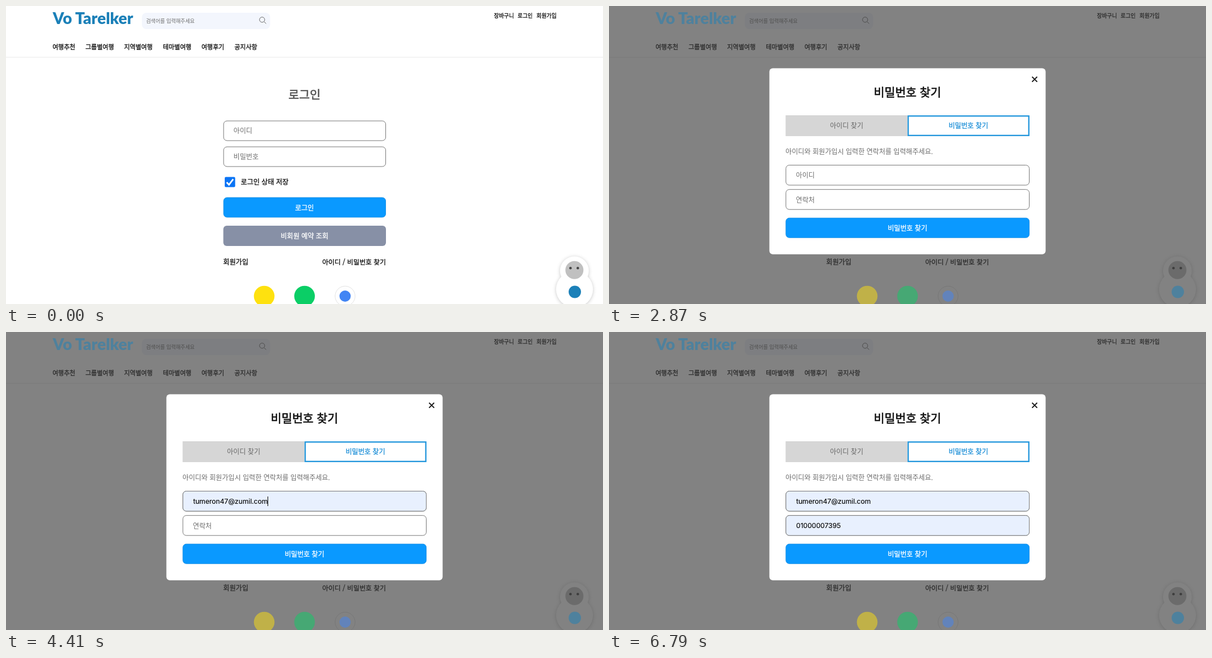
These frames come from a looping animation (1059x529 px, 8 s). An HTML page:

```html
<!DOCTYPE html>
<html lang="ko">
<head>
<meta charset="utf-8">
<title>로그인</title>
<style>
html, body { margin: 0; width: 100%; height: 100%; overflow: hidden; background: #fff; }
svg { display: block; width: 100vw; height: 100vh; }
text { font: 500 12.1px "Noto Sans CJK KR", "Noto Sans CJK", "Noto Sans KR", sans-serif; fill: #111; stroke: #111; stroke-width: .3px; }
.mid { text-anchor: middle; }
.end { text-anchor: end; }
.small { font-size: 9.7px; }
.nav text { font-size: 11px; }
.title { font-size: 20.6px; stroke-width: .6px; }
.hint { font-weight: 400; fill: #6c6c6c; stroke: none; }
.white { fill: #fff; stroke: #fff; }
.latin { font: 400 12.1px Inter, "Noto Sans", sans-serif; fill: #000; stroke-width: .15px; }
.list, .list text { font-size: 9.2px; }
.preview { font-size: 8.8px; }
.field { fill: #fff; stroke: #777; }
.filled { fill: #e8f0fe; stroke: #777; }
.primary { fill: #0a99ff; stroke: #2394e6; }
.tab-off { fill: #d6d6d6; }
.tab-on { fill: #fff; stroke: #2196dc; stroke-width: 2.3; }
.tab-label { fill: #1f90d8; stroke: #1f90d8; }
.tab-idle { fill: #666; font-weight: 400; stroke: none; }
.hover { fill: #e9e9e9; }
.popup { fill: #fff; filter: drop-shadow(0 1px 2px rgba(0,0,0,.16)); }
.bubble { fill: #fff; filter: drop-shadow(0 1px 3px rgba(0,0,0,.22)); }
.brand { font: 900 28.2px Lato, sans-serif; fill: #1b80b8; stroke: none; }

/* 8 s loop, 1% = 80 ms */
.step { visibility: hidden; animation: 8s step-end infinite; }
.dialog { animation-name: dialog; }
.find-id { animation-name: find-id; }
.find-pw { animation-name: find-pw; }
.id-hint { animation-name: id-hint; }
.id-fill { animation-name: id-fill; }
.id-menu { animation-name: id-menu; }
.id-hover { animation-name: id-hover; }
.id-value { animation-name: id-value; }
.id-caret { animation-name: id-caret; }
.id-end { animation-name: id-end; }
.tel-hint { animation-name: tel-hint; }
.tel-fill { animation-name: tel-fill; }
.tel-menu { animation-name: tel-menu; }
.tel-hover { animation-name: tel-hover; }
.tel-value { animation-name: tel-value; }
.tel-caret { animation-name: tel-caret; }
.tel-end { animation-name: tel-end; }
.art { animation: fade 8s step-end infinite; }
@keyframes fade { 0% { opacity: 1 } 13.125%, 100% { opacity: .5 } }
@keyframes dialog { 0% { visibility: hidden } 13.125%, 100% { visibility: visible } }
@keyframes find-id { 0%, 28.875%, 100% { visibility: hidden } 13.125% { visibility: visible } }
@keyframes find-pw { 0% { visibility: hidden } 28.875%, 100% { visibility: visible } }
@keyframes id-hint { 0%, 48.125%, 100% { visibility: hidden } 28.875% { visibility: visible } }
@keyframes id-fill { 0% { visibility: hidden } 48.125%, 100% { visibility: visible } }
@keyframes id-menu { 0%, 55.125%, 100% { visibility: hidden } 40.25% { visibility: visible } }
@keyframes id-hover { 0%, 55.125%, 100% { visibility: hidden } 48.125% { visibility: visible } }
@keyframes id-value { 0% { visibility: hidden } 55.125%, 100% { visibility: visible } }
@keyframes id-caret { 0%, 46.375%, 55.125%, 100% { visibility: hidden } 40.25%, 53.375% { visibility: visible } }
@keyframes id-end { 0%, 62.125%, 100% { visibility: hidden } 55.125% { visibility: visible } }
@keyframes tel-hint { 0%, 72.625%, 100% { visibility: hidden } 13.125% { visibility: visible } }
@keyframes tel-fill { 0% { visibility: hidden } 72.625%, 100% { visibility: visible } }
@keyframes tel-menu { 0%, 77.875%, 100% { visibility: hidden } 65.625% { visibility: visible } }
@keyframes tel-hover { 0%, 77.875%, 100% { visibility: hidden } 72.625% { visibility: visible } }
@keyframes tel-value { 0% { visibility: hidden } 77.875%, 100% { visibility: visible } }
@keyframes tel-caret { 0%, 71.75%, 100% { visibility: hidden } 65.625% { visibility: visible } }
@keyframes tel-end { 0%, 84.875%, 100% { visibility: hidden } 77.875% { visibility: visible } }
</style>
</head>
<body>
<svg viewBox="0 0 1059 529">
  <!-- Page -->
  <rect width="1059" height="529" fill="#fff"/>
  <rect x="241" y="12" width="227.5" height="29" rx="8" fill="#f3f6fd"/>
  <text class="hint" x="248.5" y="30.4" style="font-size:9.1px">검색어를 입력해주세요</text>
  <g fill="none" stroke="#666">
    <circle cx="454.3" cy="24.3" r="4.6"/>
    <path d="M457.6 27.6l3.8 3.8"/>
  </g>
  <text class="small" x="865.5" y="21">장바구니</text>
  <text class="small" x="907.5" y="21">로그인</text>
  <text class="small" x="941" y="21">회원가입</text>
  <g class="nav">
    <text x="82.5" y="77">여행추천</text>
    <text x="141" y="77">그룹별여행</text>
    <text x="209.5" y="77">지역별여행</text>
    <text x="278.3" y="77">테마별여행</text>
    <text x="346.7" y="77">여행후기</text>
    <text x="405.2" y="77">공지사항</text>
  </g>
  <path d="M0 91h1059" stroke="#e9e9e9"/>

  <text class="title mid" x="529.5" y="164.8" style="fill:#555;stroke:#555">로그인</text>
  <rect class="field" x="386" y="204" width="287.5" height="35" rx="6"/>
  <text class="hint" x="403.5" y="226.3">아이디</text>
  <rect class="field" x="386" y="250" width="287.5" height="35" rx="6"/>
  <text class="hint" x="403.5" y="272.3">비밀번호</text>
  <rect x="388" y="303.5" width="18.5" height="18" rx="2" fill="#0a74f5"/>
  <path d="M391.5 313l4 4.3 7.5-10" fill="none" stroke="#fff" stroke-width="2.8"/>
  <text x="416.5" y="317">로그인 상태 저장</text>
  <rect class="primary" x="386" y="340" width="287.5" height="35" rx="6"/>
  <text class="mid white" x="529.5" y="362.5">로그인</text>
  <rect x="385.5" y="390" width="288.5" height="36" rx="6" fill="#8790a6"/>
  <text class="mid white" x="529.5" y="413">비회원 예약 조회</text>
  <text x="385.3" y="458.5">회원가입</text>
  <text class="end" x="674" y="458.5" style="font-size:11.9px">아이디 / 비밀번호 찾기</text>
  <circle cx="601.5" cy="515" r="17.7" fill="#fff" stroke="#e2e2e2"/>
  <g class="bubble">
    <circle cx="1008.3" cy="470" r="25.5"/>
    <ellipse cx="1008.5" cy="503" rx="32.7" ry="32"/>
  </g>
  <circle cx="1008.3" cy="468.7" r="16" fill="#c0c0c0"/>
  <g fill="#444">
    <circle cx="1001.3" cy="465.3" r="2.3"/>
    <circle cx="1014.3" cy="465.3" r="2.3"/>
  </g>

  <rect class="step dialog" width="1059" height="529" fill="#3c3c3c" fill-opacity=".64"/>

  <g class="art">
    <text class="brand" x="83" y="32">Vo Tarelker</text>
    <circle cx="458" cy="515" r="18.3" fill="#fee10f"/>
    <circle cx="529.6" cy="515" r="18.3" fill="#0bce66"/>
    <circle cx="601.5" cy="515" r="10" fill="#4285f4"/>
    <circle cx="1009" cy="507.5" r="11" fill="#1b80b8"/>
  </g>

  <!-- Dialog -->
  <g class="step dialog">
    <rect x="284.5" y="110.5" width="490" height="330.3" rx="6" fill="#fff"/>
    <path d="M750.5 125.6l9 9m0-9l-9 9" stroke="#111" stroke-width="1.9"/>
    <rect class="field" x="313.8" y="282.5" width="431.7" height="35.5" rx="6"/>
    <rect class="field" x="313.8" y="325.7" width="431.7" height="35.5" rx="6"/>
    <rect class="primary" x="313.8" y="376.3" width="431.7" height="35" rx="6"/>
  </g>

  <g class="step find-id">
    <text class="title mid" x="529.5" y="160.5">아이디 찾기</text>
    <rect class="tab-off" x="529.5" y="194" width="216.5" height="37"/>
    <rect class="tab-on" x="314.5" y="195.3" width="213.8" height="34.5"/>
    <text class="tab-label mid" x="421.5" y="217.3">아이디 찾기</text>
    <text class="tab-idle mid" x="637.5" y="217.3">비밀번호 찾기</text>
    <text class="hint" x="313" y="263.3">회원가입시 입력한 연락처를 입력해주세요.</text>
    <text class="hint" x="331.5" y="305.3">이름</text>
    <text class="mid white" x="529.5" y="398.7">아이디 찾기</text>
  </g>

  <g class="step find-pw">
    <text class="title mid" x="529.5" y="160.5">비밀번호 찾기</text>
    <rect class="tab-off" x="313.3" y="194" width="216.2" height="37"/>
    <rect class="tab-on" x="530.7" y="195.3" width="214" height="34.5"/>
    <text class="tab-idle mid" x="421.5" y="217.3">아이디 찾기</text>
    <text class="tab-label mid" x="637.5" y="217.3">비밀번호 찾기</text>
    <text class="hint" x="313" y="263.3">아이디와 회원가입시 입력한 연락처를 입력해주세요.</text>
    <text class="mid white" x="529.5" y="398.7">비밀번호 찾기</text>
  </g>

  <!-- Account field -->
  <text class="hint step id-hint" x="331.5" y="305.3">아이디</text>
  <rect class="filled step id-fill" x="313.8" y="282.5" width="431.7" height="35.5" rx="6"/>
  <text class="latin preview step id-hover" x="332" y="305">tumeron47@zumil.com</text>
  <text class="latin step id-value" x="332" y="305">tumeron47@zumil.com</text>
  <rect class="step id-caret" x="332" y="292" width="1" height="17"/>
  <rect class="step id-end" x="464" y="292" width="1" height="17"/>

  <!-- Contact field -->
  <text class="hint step tel-hint" x="331.5" y="348.5">연락처</text>
  <rect class="filled step tel-fill" x="313.8" y="325.7" width="431.7" height="35.5" rx="6"/>
  <text class="latin preview step tel-hover" x="332" y="348.5">01000007395</text>
  <text class="latin step tel-value" x="332" y="348.4">01000007395</text>
  <rect class="step tel-caret" x="332" y="336" width="1" height="16"/>
  <rect class="step tel-end" x="415" y="336" width="1" height="16"/>

  <!-- Suggestions -->
  <g class="list step id-menu">
    <path class="popup" d="M387.5 325H393l6.5-6 6.5 6h114q3 0 3 3v78q0 3-3 3H387.5q-3 0-3-3v-78q0-3 3-3z"/>
    <rect class="hover step id-hover" x="384.5" y="328" width="138.5" height="26"/>
    <text class="latin" x="393" y="344.5">tumeron47@zumil.com</text>
    <text class="latin" x="393" y="370.4">40586027@vornase.ac.kr</text>
    <text class="latin" x="393" y="396.3">bkw-47@wubor.com</text>
  </g>
  <g class="list step tel-menu">
    <path class="popup" d="M387.5 368H393l6.5-6 6.5 6h62q3 0 3 3v26q0 3-3 3H387.5q-3 0-3-3v-26q0-3 3-3z"/>
    <rect class="hover step tel-hover" x="384.5" y="371" width="86.5" height="26"/>
    <text class="latin" x="393" y="387.7">01000007395</text>
  </g>
</svg>
</body>
</html>
```
